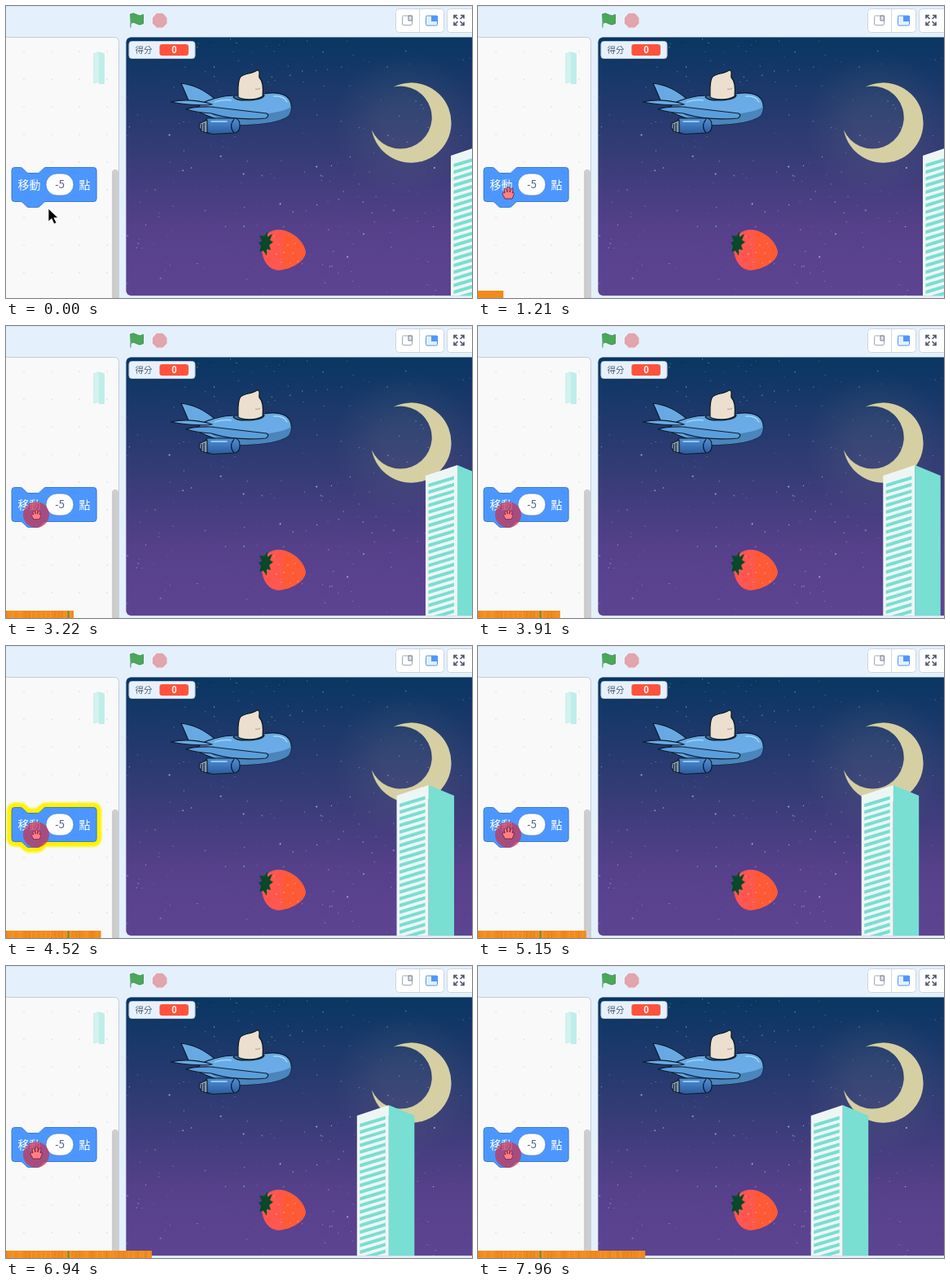
Recreate the animation shown at these times as an HTML page. Size 572 by 359 pixels, loop 8 s.

```html
<!DOCTYPE html>
<html lang="zh-Hant">
<head>
<meta charset="utf-8">
<title>Moving building</title>
<style>
  html, body { margin: 0; width: 100%; height: 100%; overflow: hidden; background: #e5f0fd; }
  svg { display: block; width: 572px; height: 359px; font-family: "Noto Sans CJK TC", "Noto Sans CJK", "Noto Sans", sans-serif; }
</style>
</head>
<body>
<svg viewBox="0 0 572 359">
  <defs>
    <linearGradient id="sky" x2="0" y2="1">
      <stop offset="0" stop-color="#083662"/>
      <stop offset=".45" stop-color="#353c75"/>
      <stop offset=".75" stop-color="#57408b"/>
      <stop offset="1" stop-color="#5d4492"/>
    </linearGradient>
    <radialGradient id="halo">
      <stop offset=".3" stop-color="#8c8b92" stop-opacity=".15"/>
      <stop offset="1" stop-color="#8c8b92" stop-opacity="0"/>
    </radialGradient>
    <linearGradient id="berry"><stop offset=".45" stop-color="#ff574e"/><stop offset=".5" stop-color="#ff5a36"/></linearGradient>
    <linearGradient id="engine" x2="0" y2="1"><stop offset="0" stop-color="#4f8fd6"/><stop offset="1" stop-color="#2a5b9e"/></linearGradient>
    <pattern id="dots" x="5" y="39" width="34" height="34" patternUnits="userSpaceOnUse"><circle cx="17" cy="17" r=".8" fill="#d8d8d8"/></pattern>
    <clipPath id="stageClip"><rect x="147.500" y="38.500" width="432" height="317.500" rx="6"/></clipPath>
    <filter id="blur" x="-20%" y="-40%" width="140%" height="180%"><feGaussianBlur stdDeviation="1"/></filter>
    <path id="block" transform="translate(7 198.500) scale(.875)" d="M0 4A4 4 0 0 1 4 0H12c2 0 3 1 4 2l4 4c1 1 2 2 4 2h12c2 0 3-1 4-2l4-4c1-1 2-2 4-2H115a4 4 0 0 1 4 4v40a4 4 0 0 1-4 4H48c-2 0-3 1-4 2l-4 4c-1 1-2 2-4 2H24c-2 0-3-1-4-2l-4-4c-1-1-2-2-4-2H4a4 4 0 0 1-4-4z"/>
  </defs>

  <!-- Workspace -->
  <path d="M0 0H572" stroke="#c5d3e5"/>
  <path d="M-1 38.500H133q5.500 0 5.500 6V360H-1z" fill="#f9f9f9" stroke="#c3cddb"/>
  <rect y="39" width="128" height="320" fill="url(#dots)"/>
  <path d="M114 56L121 58.500V96H114z" fill="#a9eae3" opacity=".75"/>
  <g id="thumbnail" stroke="#9be6de" opacity=".8"></g>
  <rect x="130" y="201" width="8" height="170" rx="4" fill="#cecdce"/>
  <use id="glow" href="#block" fill="none" stroke="#fff200" stroke-width="14" stroke-linejoin="round" filter="url(#blur)"/>
  <use href="#block" fill="#4c97ff" stroke="#3373cc"/>
  <rect x="49" y="206" width="34" height="27" rx="13.500" fill="#fff" stroke="#3373cc" stroke-width=".7"/>
  <g font-size="14" fill="#fff">
    <text x="14.500" y="224.500">移動</text>
    <text x="89.500" y="224.500">點</text>
    <text x="66" y="224" font-size="13" fill="#575e75" text-anchor="middle">-5</text>
  </g>

  <!-- Toolbar -->
  <path d="M152 10.500q4-3 8 0t8.500 0v11q-4.500 3-8.500 0t-7 0v5" fill="#4aa75b" stroke="#3f9650" stroke-linejoin="round"/>
  <path id="stop" d="M185 9h7.500l5 5.500v7l-5 5H185l-5-5v-7z"/>
  <g fill="#fff" stroke="#ccd6e3">
    <rect x="478.500" y="3.500" width="59" height="29" rx="4"/>
    <rect x="541.500" y="3.500" width="34" height="29" rx="4"/>
    <path d="M507.500 4v28"/>
  </g>
  <rect x="486.500" y="12" width="12" height="11.500" rx="1.500" fill="#fff" stroke="#a3a8b6"/>
  <path d="M494 12h4.500v6H494z" fill="#dcdfe8" stroke="#7a8195"/>
  <rect x="515.500" y="12" width="14" height="12" rx="1.500" fill="#e6f0ff" stroke="#4c97ff"/>
  <path d="M522 12h8v7h-8z" fill="#4c97ff"/>
  <path d="M550 15.500v-4h4m4 0h4v4m0 4v4h-4m-4 0h-4v-4M550.500 12l4 4m7-4l-4 4m4 7l-4-4m-7 4l4-4" fill="none" stroke="#4f566d" stroke-width="1.600"/>

  <!-- Stage -->
  <rect x="147" y="38" width="432" height="318.500" rx="7" fill="#c3cfe0"/>
  <g clip-path="url(#stageClip)">
    <rect x="147" y="38" width="425" height="318" fill="url(#sky)"/>
    <circle cx="490" cy="145" r="88" fill="url(#halo)"/>
    <g id="stars"></g>
    <path d="M449 152.500A49.200 49.200 0 1 0 475.500 99.500A38.500 38.500 0 1 1 449 152.500z" fill="#d6cfa3"/>
    <g id="building">
      <path d="M39 171L70.500 184V360H39z" fill="#78dfd2"/>
      <path d="M0 184L39 171V360H0z" fill="#eef6f5"/>
      <g id="windows" fill="#79ded2"></g>
    </g>

    <g stroke="#0c1c2c" stroke-width="1.200" stroke-linejoin="round">
      <path d="M224 116L215 95C232 97 246 105 257 115L245 122z" fill="#68a9e4"/>
      <path d="M240 120Q250 115 259 113C268 110 277 110 284 110C295 107 307 109 316 108C327 106 338 107 344 111C352 117 351 127 348 133C341 142 315 146 288 146C270 143 248 136 232 128z" fill="#68abe6"/>
      <path d="M350 124C338 133 290 137 252 133C264 141 276 144 288 146C315 146 341 142 348 133Q350 129 350 124z" fill="#4a86bd" stroke="none"/>
      <path d="M202 118C218 114 239 116 253 121C240 123 220 121 202 118z" fill="#68a9e4"/>
      <path d="M279 112C283 107 312 105 317 110C314 117 284 118 279 112z" fill="#3c6f9f"/>
      <path d="M285 112C285 102 284 92 288 87C294 82 302 84 308 79C313 79 310 85 311 88C316 93 316 101 315 111C307 116 291 116 285 112z" fill="#ecdfcf"/>
      <path d="M221 127C232 123 242 124 252 124C277 127 302 130 320 132Q324 135 319 138C295 140 270 138 252 132Q234 131 221 127z" fill="#5b9ddb"/>
      <path d="M247 138H281Q287 139 287 147Q287 155 281 156L255 157.500Q244 157 244 149Q243 141 247 138z" fill="url(#engine)"/>
      <path d="M247 140L238 144L237 149L240 154L247 156z" fill="#8499ae"/>
      <path d="M240 145v8m3-9v10M280 139q-7 9 0 17" fill="none"/>
    </g>
    <g fill="none" stroke="#b1d8f6" stroke-width="1.300" stroke-linecap="round">
      <path d="M329 111q12-1 16 7M256 118q12-4 20-2M252 142h19"/>
    </g>
    <path d="M306 102q4 1 6-1" stroke="#aa9d91" fill="none"/>

    <path d="M314 292C319 276 332 272 345 277C358 282 367 293 368 303C367 314 350 324 334 325C319 323 313 309 314 292z" fill="url(#berry)"/>
    <path d="M321 277l0 7 6-4-3 8 4 2-5 4 2 6-5-1 0 8-4-6-5 1 2-7-3-4 4-2-3-7 6 1z" fill="#07492a"/>
    <g id="seeds" fill="#ffad54"></g>

    <rect x="151" y="43.500" width="81" height="21" rx="3.500" fill="#e7f1fe" stroke="#bdc9d9"/>
    <text x="158.500" y="58" font-size="10.500" fill="#575e75">得分</text>
    <rect x="188.500" y="47" width="35.500" height="14" rx="3" fill="#ff523c"/>
    <text x="206.500" y="57.500" font-size="11" font-weight="600" fill="#fff" text-anchor="middle">0</text>
  </g>

  <rect id="progress" y="350" height="9" fill="#f28a1c"/>
  <g id="streaks"></g>

  <!-- Pointer -->
  <path id="arrow" d="M0 0V16L4 12.500L7 19L10 17.500L7 11.500H12z" fill="#000" stroke="#fff" stroke-width=".8"/>
  <circle id="press" cx="37" cy="232" r="16" fill="#c9304f" opacity=".72"/>
  <path id="hand" d="M-4 7L-7 1Q-7-2-4 0L-5-5Q-4-7-2-5L-1-1V-7Q1-9 2-6V-1L4-6Q6-7 6-4L5 0Q8-2 7 2L5 7z" fill="#ff7f86" stroke="#6c1637" stroke-width=".8"/>
</svg>

<script>
const LOOP = 8000, BAR_SPEED = .02578, STEP = 4.43, START_X = 546;
const byId = id => document.getElementById(id);
const [building, glow, stop, progress, arrow, press, hand] =
  ["building", "glow", "stop", "progress", "arrow", "press", "hand"].map(byId);

function random(seed) {
  return () => (seed = (seed * 16807) % 2147483647) / 2147483647;
}

function add(parent, tag, attributes) {
  const node = document.createElementNS("http://www.w3.org/2000/svg", tag);
  for (const name in attributes) node.setAttribute(name, attributes[name]);
  return byId(parent).appendChild(node);
}

const show = (node, visible) => node.setAttribute("visibility", visible ? "visible" : "hidden");

const rnd = random(4271);
for (let i = 0; i < 260; i++) {
  add("stars", "circle", {
    cx: 148 + rnd() * 424, cy: 39 + rnd() * 317,
    r: i % 13 ? .35 + rnd() * .35 : 1,
    fill: ["#a9c9e8", "#d8cfe8", "#69b6ce"][i % 3], opacity: .3 + rnd() * .5
  });
}
for (let y = 194; y < 365; y += 8.2) {
  add("windows", "path", { d: `M3.500 ${y}L35 ${y - 9.5}v4.200L3.500 ${y + 4.2}z` });
}
for (let y = 59; y < 97; y += 2) {
  add("thumbnail", "path", { d: `M107 ${y}L114 ${y - 2}` });
}
for (let i = 0; i < 10; i++) {
  add("seeds", "circle", { cx: 329 + (i * 17) % 31, cy: 283 + (i * 11) % 34, r: .8 });
}

const streaks = [];
for (let x = 1; x < 200; x += 2 + rnd() * 5) {
  streaks.push({ x, node: add("streaks", "path", {
    d: `M${x} 350v9`, stroke: rnd() < .5 ? "#df7a1c" : "#f7a13a", opacity: .7
  }) });
}
streaks.push({ x: 76, node: add("streaks", "path", { d: "M76.500 350v9", stroke: "#718b35", "stroke-width": 2 }) });

// Time and number of block clicks; the fraction is the phase within a click.
const clicks = [
  [0, 0], [1700, .5], [2130, 2.2], [3220, 7.2], [4220, 13.2], [4520, 15.5], [5070, 17.2],
  [5780, 21.8], [5940, 22.2], [6780, 25.2], [6940, 26.8], [7640, 30.1], [8000, 31.4]
];

function clickCount(t) {
  const i = clicks.findIndex(([time]) => time > t);
  const [t0, n0] = clicks[i - 1], [t1, n1] = clicks[i];
  return n0 + (n1 - n0) * (t - t0) / (t1 - t0);
}

function draw(now) {
  const t = now % LOOP;
  const count = clickCount(t), phase = count % 1;
  const active = t > 1750;
  building.setAttribute("transform", `translate(${START_X - Math.floor(count) * STEP} 0)`);
  show(glow, active && phase > .35 && phase < .65);
  stop.setAttribute("fill", active && phase < .15 ? "#ec5959" : "#e2a4ad");

  const width = t * BAR_SPEED;
  progress.setAttribute("width", width);
  for (const { x, node } of streaks) show(node, t > 2590 && x < width - 2);

  const approach = Math.min(1, t / 700), ease = approach * approach * (3 - 2 * approach);
  arrow.setAttribute("transform", `translate(${52 - 15 * ease} ${249 - 17 * ease})`);
  show(arrow, t < 600);
  show(hand, t >= 600);
  show(press, t >= 1300);
  const open = !active || phase > .65;
  hand.setAttribute("transform", `translate(37 ${open ? 230 : 232}) scale(${open ? 1 : .8})`);
}

const start = performance.now();
function tick() {
  draw(performance.now() - start);
  requestAnimationFrame(tick);
}
tick();
</script>
</body>
</html>
```
